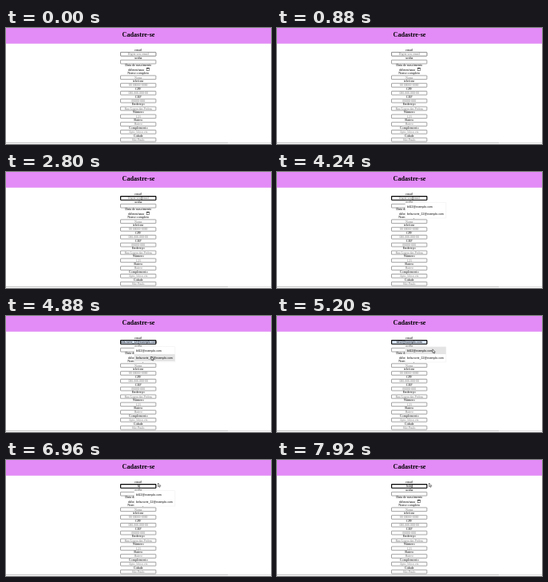
An HTML page that plays this animation: 332 by 146 pixels, repeating every 8000 ms.

```html
<!DOCTYPE html>
<html lang="pt-BR">
<head>
<meta charset="utf-8">
<title>Cadastre-se</title>
<style>
html, body { margin: 0; width: 100%; height: 100%; overflow: hidden; background: #fff; }
svg { display: block; width: 100vw; height: 100vh; }
text { font-family: "Liberation Serif", serif; text-anchor: middle; }
.sans { font-family: "Liberation Sans", sans-serif; }
.left { text-anchor: start; }
</style>
</head>
<body>
<svg id="stage" viewBox="0 0 332 146">
  <rect width="332" height="19.7" fill="#e38bf7"/>
  <text x="166" y="11" font-size="8.1" font-weight="bold">Cadastre-se</text>
  <g id="form"></g>
  <rect y="144" width="278" height="1" fill="#c4c4c4"/>
  <rect x="278" y="144" width="54" height="1" fill="#dedede"/>
  <rect id="field" x="143.6" y="30.6" width="44.2" height="4.6" rx=".5" stroke="#000"/>
  <text id="value" x="165.7" y="34.2"></text>
  <rect id="caret" y="31.2" width=".5" height="3.5"/>
  <g id="menu">
    <rect x="160.7" y="38.4" width="51" height="19.6" rx=".5" fill="#fff" stroke="#e9e9e9" stroke-width=".4"/>
    <rect id="hover" x="160.8" width="50.9" height="9" fill="#e4e4e4"/>
    <text class="sans left" id="item0" x="163" y="44.6" font-size="3.5"></text>
    <text class="sans left" id="item1" x="163" y="53.6" font-size="3.5"></text>
  </g>
  <g id="arrow">
    <path d="M0 0V4.6L1.1 3.7L1.9 5.4L2.6 5L1.9 3.4H3.3Z" fill="#fff" stroke="#222" stroke-width=".55"/>
  </g>
  <path id="beam" d="M-.7 -2.2H.7M0 -2.2V2.2M-.7 2.2H.7" stroke="#222" stroke-width=".5"/>
</svg>
<script>
const LOOP = 8000, STEP = 80;
const $ = id => document.getElementById(id);
const mails = ["bli12@exemplo.com", "bela.norte_12@exemplo.com"];
const hint = "Digite seu email";

// label, placeholder; the third row is a date control
const rows = [
  ["email", ""], ["senha", ""], ["Data de nascimento", null],
  ["Nome completo", "Nome"], ["telefone", "00 00000-0000"],
  ["CPF", "000.000.000-00"], ["CEP", "00000-000"],
  ["Endereço", "Rua Lagoa das Pedras"], ["Número", "123"],
  ["Bairro", "Bairro"], ["Complemento", "Apto, bloco etc"], ["Cidade", "São Paulo"]
];

function add(tag, attrs, text = "") {
  const el = document.createElementNS("http://www.w3.org/2000/svg", tag);
  for (const key in attrs) el.setAttribute(key, attrs[key]);
  el.textContent = text;
  $("form").append(el);
}

rows.forEach(([label, sample], i) => {
  const y = 30.5 + i * 9.8;
  add("text", { x: 165.7, y: y - 1.7, "font-size": 4.2 }, label);
  if (sample === null) {
    add("text", { x: 163, y: y + 3.6, "font-size": 4.1 }, "dd/mm/aaaa");
    add("rect", { x: 176.2, y: y + .3, width: 3, height: 3.4, fill: "none", stroke: "#222", "stroke-width": .5 });
    add("rect", { x: 176, y: y, width: 3.4, height: 1, fill: "#222" });
  } else {
    add("rect", { x: 143.5, y, width: 44.3, height: 4.7, rx: .4, fill: "#fff", stroke: "#666", "stroke-width": .6 });
    add("text", { x: 165.7, y: y + 3.7, "font-size": 3.9, fill: "#777" }, sample);
  }
});
mails.forEach((mail, i) => $("item" + i).textContent = mail);

// time, x, y of the pointer
const path = [
  [960, 181, -6], [1600, 176, 19.7], [1840, 176, 19.7], [2400, 170, 33],
  [4240, 170, 33], [4640, 182, 51], [4960, 182, 51], [5600, 223, 22],
  [6000, 223, 22], [6640, 190.5, 29]
];

function pointer(t) {
  let a = path[0];
  for (const b of path) {
    if (t < b[0]) {
      const p = Math.max(0, (t - a[0]) / (b[0] - a[0] || 1));
      const e = p * p * (3 - 2 * p);
      return [a[1] + (b[1] - a[1]) * e, a[2] + (b[2] - a[2]) * e];
    }
    a = b;
  }
  return [a[1], a[2]];
}

const show = (id, on) => $(id).setAttribute("visibility", on ? "visible" : "hidden");

function typed(t) {
  const count = [6880, 7280, 7600, 7760].filter(at => t >= at).length;
  return "bsbj".slice(0, count);
}

function draw(t) {
  const focus = t >= 2400;
  const open = t >= 2960 && t < 7360;
  const [x, y] = pointer(t);
  const inside = open && x > 161 && x < 212;
  const pick = inside && y > 39 && y < 58 ? (y < 48 ? 0 : 1) : -1;
  const input = typed(t);
  const value = $("value"), field = $("field");

  field.setAttribute("stroke-width", focus ? 1.1 : .6);
  field.setAttribute("stroke", focus ? "#000" : "#666");
  field.setAttribute("fill", pick < 0 ? "#fff" : "#dce9fb");
  value.textContent = pick < 0 ? input || hint : mails[pick];
  value.setAttribute("class", pick < 0 ? "" : "sans");
  value.setAttribute("font-size", pick < 0 ? 4 : 3.5);
  value.setAttribute("fill", pick < 0 && !input ? "#757575" : "#000");

  show("caret", input);
  if (input) $("caret").setAttribute("x", 165.9 + value.getComputedTextLength() / 2);
  show("menu", open);
  show("hover", pick >= 0);
  $("hover").setAttribute("y", pick ? 48 : 39);

  const beam = x > 143 && x < 188 && y > 30 && y < 36;
  show("beam", beam);
  show("arrow", !beam);
  for (const id of ["beam", "arrow"]) $(id).setAttribute("transform", `translate(${x} ${y})`);
}

function tick() {
  const t = performance.now() % LOOP;
  draw(Math.floor(t / STEP) * STEP);
  requestAnimationFrame(tick);
}
tick();
</script>
</body>
</html>
```
